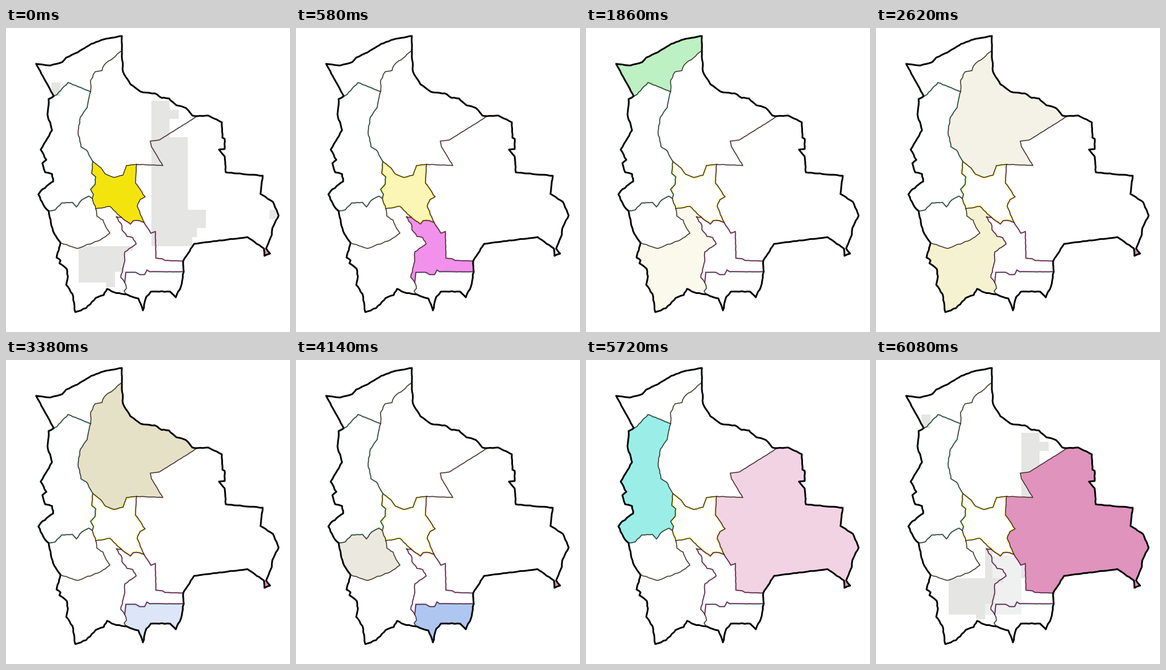
Animation of 500x535 px, one loop 6300 ms. Source, as a matplotlib script:

```python
import matplotlib.pyplot as plt
import numpy as np
from matplotlib.animation import FuncAnimation
from matplotlib.patches import Polygon, Rectangle

W, H = 500, 535
PX = 0.72  # points per pixel at 100 dpi
LOOP, TICK = 6300, 20
HOLD, STEP, STEPS = 220, 60, 10
CYCLE = HOLD + STEP * (STEPS - 1)

rng = np.random.default_rng(7)

# Junctions where frontier and borders meet
NODES = dict(
    a=(204, 40), b=(337, 155), c=(312, 410), d=(313, 429),
    e=(213, 469), f=(96, 378), g=(75, 322), h=(84, 120),
    i=(149, 112), j=(153, 235), k=(230, 240), l=(243, 342),
    m=(152, 300), n=(158, 318), o=(203, 333), p=(209, 448))
EDGES = {}


def rgb(*c):
    return tuple(v / 255 for v in c)


def roughen(keys, amp, gap=5):
    """Fill in the stretches between key points with small random bends."""
    out = [keys[:1]]
    for p, q in zip(keys, keys[1:]):
        d = q - p
        size = np.hypot(*d)
        n = max(1, round(size / gap))
        s = np.arange(1, n + 1)[:, None] / n
        bend = rng.uniform(-amp, amp, (n, 1))
        bend[-1] = 0
        out.append(p + d * s + bend * np.array([-d[1], d[0]]) / size)
    return np.vstack(out)


def edge(ends, *via, amp=0.8):
    keys = [NODES[ends[0]], *zip(via[::2], via[1::2]), NODES[ends[1]]]
    EDGES[ends] = roughen(np.array(keys, float), amp)


def walk(nodes):
    """Closed outline through the named junctions."""
    pairs = zip(nodes, nodes[1:] + nodes[0])
    return np.vstack([EDGES[u + v] if u + v in EDGES else EDGES[v + u][::-1]
                      for u, v in pairs])


# Frontier, clockwise from the top
edge("ab", 206, 77, 219, 99, 237, 112, 262, 115, 274, 123, 287, 124,
     300, 136, 317, 141, 328, 154)
edge("bc", 356, 154, 380, 166, 381, 193, 385, 195, 385, 213, 375, 214,
     385, 226, 387, 254, 452, 260, 448, 292, 470, 306, 480, 330, 469, 352,
     468, 364, 458, 388, 465, 397, 455, 401, 454, 388, 425, 368, 331, 380,
     amp=0.5)
edge("cd")
edge("de", 308, 455, 299, 474, 289, 464, 255, 464, 247, 473, 241, 497,
     233, 476)
edge("ef", 190, 465, 178, 459, 172, 470, 158, 475, 141, 493, 122, 500,
     117, 468, 106, 452, 109, 437, 107, 424, 94, 414, 96, 409, 89, 404,
     93, 391)
edge("fg", 85, 362, 79, 343)
edge("gh", 68, 315, 57, 293, 61, 287, 83, 270, 81, 257, 69, 254, 64, 238,
     71, 232, 61, 214, 70, 199, 81, 180, 73, 152, 75, 125)
edge("ha", 53, 63, 78, 66, 99, 60, 106, 52, 126, 43, 150, 28, 172, 20,
     204, 14, amp=0.4)

# Inner borders
edge("hi", 90, 117, 109, 96)
edge("ai", 173, 65, 169, 75, 157, 77, 149, 92)
edge("ij", 143, 140, 131, 157, 127, 183, 132, 209, 142, 215)
edge("jk", 167, 246, 175, 257, 190, 263, 206, 259, 212, 242, amp=0.4)
edge("kb", 276, 242, 256, 209, 254, 199, 270, 197, amp=0.4)
edge("kl", 228, 273, 245, 297, 236, 302, 231, 314)
edge("jm", 151, 256, 158, 262, 157, 275, 149, 284, 154, 293)
edge("mn")
edge("gm", 87, 320, 98, 308, 117, 307, 124, 315, 133, 303, 146, 296)
edge("no", 183, 314)
edge("ol", 219, 345, 224, 339, 235, 339)
edge("op", 194, 332, 204, 348, 204, 355, 213, 367, 223, 369, 229, 380,
     209, 394, 209, 410, 202, 439)
edge("pe", 212, 458, 208, 463)
edge("pd", 211, 430, 228, 430, 235, 434, 244, 434, 248, 426, 253, 429,
     amp=0.3)
edge("lc", 255, 361, 263, 358, 264, 405, 275, 406, 280, 409, amp=0.4)
edge("fn", 126, 388, 166, 373, 183, 361, 174, 346, 171, 338, 160, 331)

COAST = "abcdefgh"

# Regions in order of lighting up: junctions, colour, strength of edge tint
REGIONS = [
    ("jklonm", rgb(244, 228, 14), 0.9),
    ("olcdp", rgb(237, 99, 229), 0.6),
    ("hai", rgb(161, 235, 169), 0.4),
    ("nopef", rgb(241, 237, 190), 0.3),
    ("abkji", rgb(219, 213, 176), 0.3),
    ("pde", rgb(142, 174, 234), 0.4),
    ("gmnf", rgb(190, 185, 152), 0.3),
    ("hijmg", rgb(88, 228, 218), 0.6),
    ("kbcl", rgb(224, 147, 188), 0.3),
]

fig = plt.figure(figsize=(5, 5.35), dpi=100, facecolor="white")
ax = fig.add_axes([0, 0, 1, 1])
ax.set_xlim(0, W)
ax.set_ylim(H, 0)
ax.axis("off")


def shape(pts, color, z):
    return ax.add_patch(Polygon(pts, fc=color, ec="none", lw=0, zorder=z))


land = shape(walk(COAST), "white", 0)


def block(x, y, w, h, color=rgb(229, 229, 228), z=2, cell=16):
    """Grey patch on a coarse grid, cut off at the frontier."""
    r = ax.add_patch(Rectangle((x * cell, y * cell), w * cell, h * cell,
                               fc=color, ec="none", lw=0, zorder=z))
    r.set_clip_path(land)
    return r


blocks = [block(*b) for b in (
    (5, 6, 1, 1.5), (29, 20, 1, 1),
    (16, 8, 2, 16), (18, 9, 1, 1), (18, 12, 2, 12), (20, 20, 2, 2),
    (20, 22, 1, 1), (20, 23, 0.5, 1),
    (8, 24, 6, 0.5), (8, 24, 5, 2.8), (8, 24, 4, 4), (11, 28, 1, 0.5))]
late_blocks = [block(12, 21.5, 4, 6.5, rgb(239, 240, 240), 1),
               block(12, 20.6, 0.8, 3.4)]

fills = []
for nodes, color, tint in REGIONS:
    pts = walk(nodes)
    fill = shape(pts, color, 3)
    fills.append(fill)
    rim = ax.add_patch(Polygon(pts, fc="none", ec=color, lw=3.2 * PX,
                               alpha=tint, zorder=4))
    rim.set_clip_path(fill)

tail = shape([(454, 388), (458, 388), (465, 397), (455, 401)],
             rgb(224, 147, 188), 5)

for ends, pts in EDGES.items():
    if ends not in COAST + COAST[0]:
        ax.plot(*pts.T, color=rgb(52, 38, 34), lw=1.4 * PX, zorder=6,
                solid_joinstyle="round")
ax.add_patch(Polygon(walk(COAST), fc="none", ec="black", lw=3 * PX,
                     joinstyle="round", zorder=7))


def weights(t):
    """Share of each region's colour at time t, in ms."""
    w = np.zeros(len(REGIONS))
    i, rest = divmod(t, CYCLE)
    if rest < HOLD:
        w[i] = 1
    else:
        a = ((rest - HOLD) // STEP + 1) / STEPS
        w[i], w[i + 1] = 1 - a, a
    return w


def draw(n):
    t = n * TICK
    w = weights(t)
    for fill, a in zip(fills, w):
        fill.set_alpha(a)
        fill.set_visible(a > 0)
    tail.set_alpha(max(0.0, 1 - w[1] - w[2]))
    last = t >= LOOP - HOLD
    for b in blocks:
        b.set_visible(t < HOLD or last)
    for b in late_blocks:
        b.set_visible(last)
    return fills


anim = FuncAnimation(fig, draw, frames=LOOP // TICK, interval=TICK,
                     repeat=True, repeat_delay=0, blit=False)
plt.show()
```
